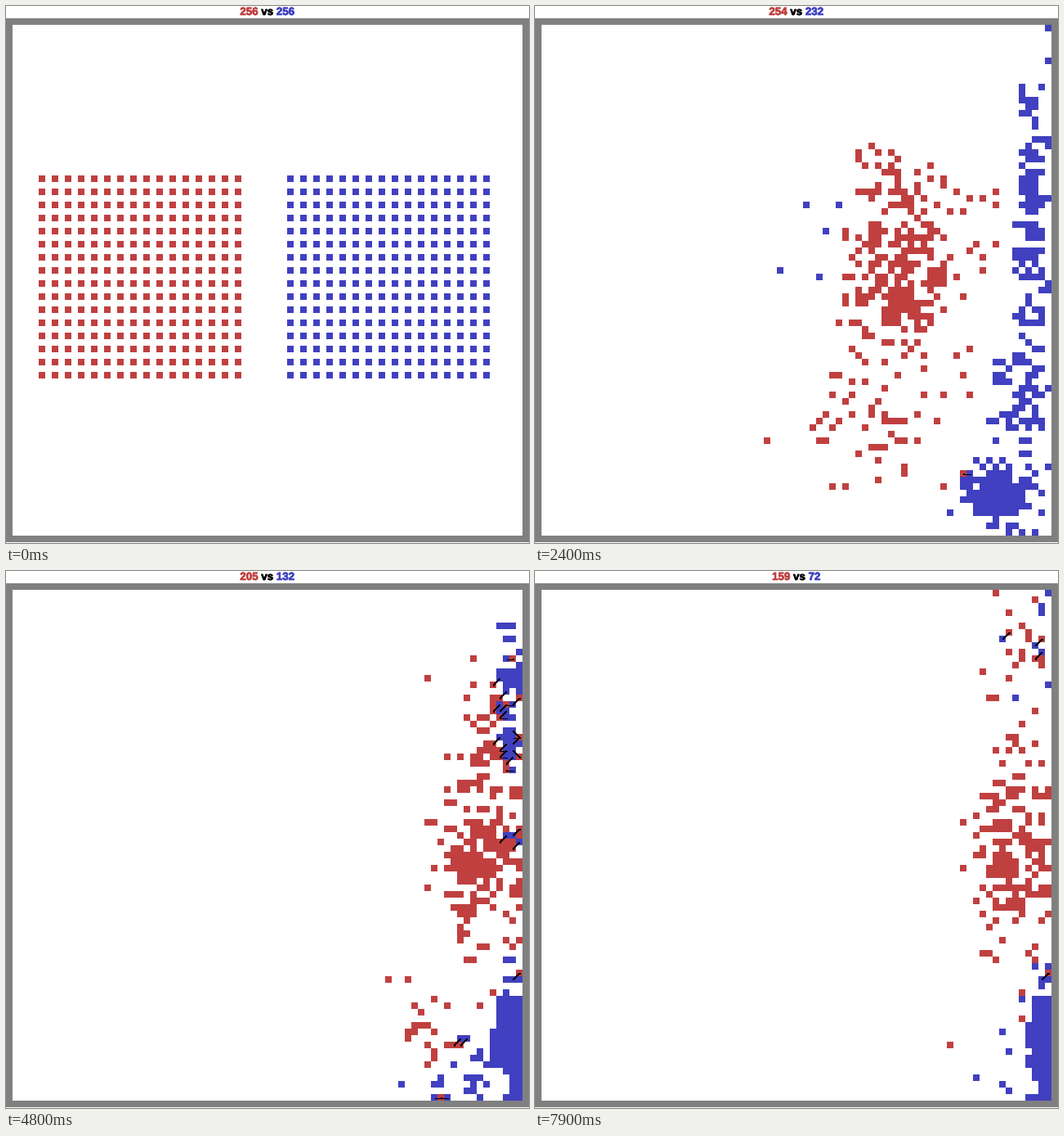
Write a matplotlib script that moves like this. It is 640x656 px and loops after 8000 ms.

```python
import numpy as np
import matplotlib.pyplot as plt
from matplotlib import patheffects
from matplotlib.animation import FuncAnimation
from matplotlib.collections import LineCollection

W, H, TOP, CELL, N = 640, 656, 15, 8, 80
FRAMES, SIDE = 80, 16
RED, BLUE = (192, 64, 64), (64, 64, 192)
GREY, WHITE = (128, 128, 128), (255, 255, 255)
rng = np.random.default_rng(11)


def ease(u):
    return 1 - (1 - np.clip(u, 0, 1)) ** 1.6


class Squad:
    """Units that walk together through stops (time, x, y, spread x, spread y)."""

    def __init__(self, cells, toughness, *stops):
        n = len(cells)
        self.times = [0] + [stop[0] for stop in stops]
        self.points = [cells] + [rng.normal((x, y), (sx, sy), (n, 2))
                                 for _, x, y, sx, sy in stops]
        self.pace = rng.uniform(0.85, 1.15, (n, 1))
        self.resist = rng.random(n) * toughness

    def at(self, frame):
        t = frame * self.pace
        pos = self.points[0].copy()
        for t0, t1, p, q in zip(self.times, self.times[1:],
                                self.points, self.points[1:]):
            pos += (q - p) * ease((t - t0) / (t1 - t0))
        return pos


class Army:
    """Squads that lose their least resistant units first."""

    def __init__(self, tally, *squads):
        self.tally, self.squads = tally, squads
        resist = np.concatenate([s.resist for s in squads])
        self.rank = resist.argsort().argsort()

    def at(self, frame):
        left = round(np.interp(frame, TALLY_TIMES, self.tally))
        pos = np.vstack([s.at(frame) for s in self.squads])
        return pos[self.rank >= len(pos) - left]


index = np.arange(SIDE * SIDE)
col, row = np.divmod(index, SIDE)


def block(x0):
    return np.column_stack([x0 + 2.0 * col, 24 + 2.0 * row])


TALLY_TIMES = [0, 8, 24, 36, 48, 66, 79]

reds, blues = block(5), block(43)
low = row > 12
hunt = (row < 2) & (col < 10)
duel = (row < 10) & (col > 11)
caught = index < 27
upper = ~caught & (row < 7)
corner = ~caught & (row > 6) & (col < 9)
wall = (row > 6) & (col > 8)

red_army = Army(
    [256, 256, 254, 233, 205, 170, 159],
    Squad(reds[duel], 4.2, (8, 42, 31, 3, 2.5), (24, 61, 33, 4, 6),
          (48, 73, 39, 3, 9)),
    Squad(reds[~(low | hunt | duel)], 4.2, (48, 73, 39, 3.3, 10)),
    Squad(reds[hunt], 4.2, (48, 74, 24, 2, 4), (70, 74, 8, 2.5, 4)),
    Squad(reds[low], 1, (24, 51, 61, 7, 7), (60, 67, 70, 2.5, 4)))
blue_army = Army(
    [256, 245, 232, 196, 132, 84, 72],
    Squad(blues[caught], 0.05, (8, 42, 33, 3, 5)),
    Squad(blues[upper], 1, (9, 74, 36, 3, 7), (24, 76, 32, 1.2, 13),
          (50, 76.5, 16, 1.2, 8), (66, 76, 8, 2, 5)),
    Squad(blues[corner], 1, (9, 70, 50, 4, 7), (22, 69.5, 72, 2.2, 2.6),
          (48, 70, 72, 4, 4)),
    Squad(blues[wall], 20, (9, 74, 47, 3, 9), (24, 74, 60, 2.5, 9),
          (50, 77.5, 69, 0.9, 5)))

NEAR = sorted(((x, y) for x in range(-6, 7) for y in range(-6, 7)),
              key=lambda d: d[0] ** 2 + d[1] ** 2)
AIMS = [(1, -1), (-1, 1), (1, 0), (-1, 0), (1, 1)]


def settle(x, y, owner, team):
    """Put a unit on the free cell closest to (x, y)."""
    for dx, dy in NEAR:
        cx, cy = x + dx, y + dy
        if 0 < cx < N - 1 and 0 < cy < N - 1 and owner[cy, cx] < 0:
            owner[cy, cx] = team
            return


def field(frame, noise):
    owner = np.full((N, N), -1)
    counts = {}
    for team, army in ((1, blue_army), (0, red_army)):
        pos = army.at(frame)
        pos += noise.normal(0, 0.6, pos.shape) * min(1, frame / 8)
        for x, y in np.clip(np.rint(pos).astype(int), 1, N - 2):
            settle(x, y, owner, team)
        counts[team] = len(pos)
    return owner, counts


def centre(x, y):
    return CELL * x + 4.5, TOP + CELL * y + 4.5


def attacks(owner, noise):
    shots = []
    for y, x in np.argwhere(owner == 1):
        hits = [(x + dx, y + dy) for dx, dy in AIMS
                if owner[y + dy, x + dx] == 0]
        if noise.random() < 0.85:
            for hit in hits[:1 + (noise.random() < 0.4)]:
                shots.append((centre(x, y), centre(*hit)))
    return shots


fig = plt.figure(figsize=(W / 100, H / 100), dpi=100, facecolor="white")
ax = fig.add_axes([0, 0, 1, 1])
ax.axis("off")
board = np.full((N, N, 3), GREY, np.uint8)
image = ax.imshow(board, extent=(0, W, TOP + N * CELL, TOP),
                  interpolation="nearest", aspect="auto")
ax.set_xlim(0, W)
ax.set_ylim(H, 0)
lines = ax.add_collection(LineCollection([], colors="black", linewidths=0.6,
                                         antialiaseds=False))
dots = ax.scatter([], [], s=3, c="black", marker="s", linewidths=0)

FONT_PX = 13.33
DIGIT, SPACE = 0.556 * FONT_PX, 0.278 * FONT_PX


def label(rgb):
    colour = [c / 255 for c in rgb]
    return ax.text(0, 11, "", color=colour, family="Liberation Sans",
                   weight="bold", size=FONT_PX * 0.72, va="baseline",
                   path_effects=[patheffects.withStroke(linewidth=0.5,
                                                        foreground=colour)])


labels = [label(RED), label((0, 0, 0)), label(BLUE)]
palette = np.array([RED, BLUE, WHITE], np.uint8)


def draw(frame):
    noise = np.random.default_rng(frame)
    owner, counts = field(frame, noise)
    board[1:-1, 1:-1] = palette[owner[1:-1, 1:-1]]
    image.set_data(board)
    shots = attacks(owner, noise)
    lines.set_segments(shots)
    dots.set_offsets([end for _, end in shots] or np.empty((0, 2)))

    words = [str(counts[0]), "vs", str(counts[1])]
    x = (W - DIGIT * sum(map(len, words)) - 2 * SPACE) / 2 - 0.3
    for text, word in zip(labels, words):
        text.set_text(word)
        text.set_x(x)
        x += DIGIT * len(word) + SPACE
    return [image, lines, dots, *labels]


anim = FuncAnimation(fig, draw, frames=FRAMES, interval=100, repeat=True,
                     repeat_delay=0, blit=False)
plt.show()
```
